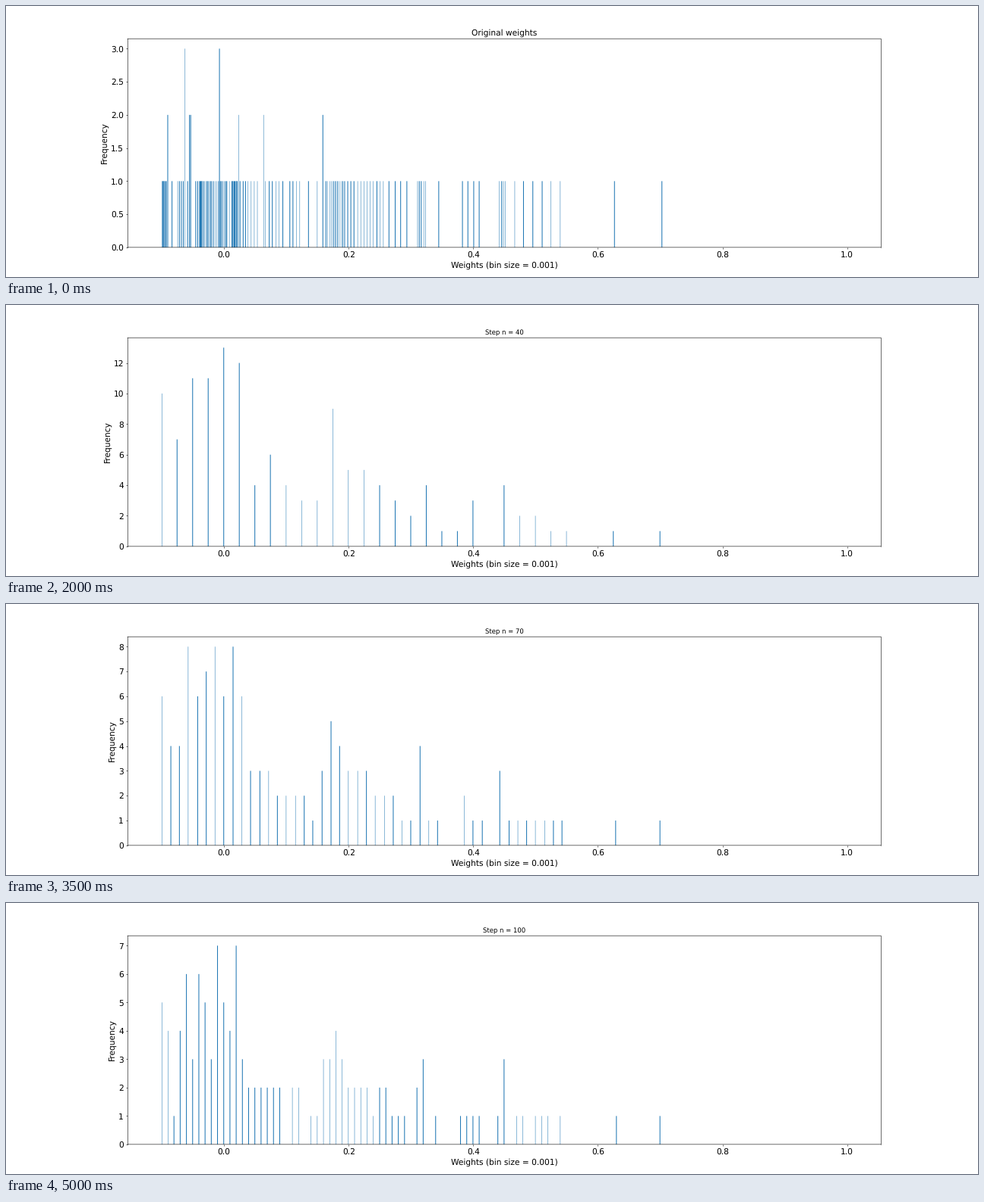
A matplotlib script for the animation above (5.5 s loop, 1280x358 px).

```python
import numpy as np
import matplotlib.pyplot as plt
from matplotlib.animation import FuncAnimation

DPI = 51.2
FONT = 15
PRINT_W, PRINT_H = 2500, 700  # bars and frame sit on this finer pixel grid

# Sorted weights (in thousandths) follow a curve through a few (rank, weight) points
curve = np.array([
    (0, -100), (6, -93.2), (8, -75), (11, -66), (13, -59), (14, -46),
    (16, -40), (21, -35), (28, -18.4), (32, -6), (37, 4.4), (39, 11.6),
    (46, 21.4), (49, 33.7), (53, 53), (54, 66), (59, 94), (60, 105),
    (63, 121), (66, 163), (76, 193), (88, 255), (92, 293), (93, 310),
    (97, 323), (98, 344), (99, 382), (102, 409), (103, 441.5), (106, 451),
    (112, 539), (113, 626), (114, 702),
])
singles = np.interp(np.arange(115), *curve.T)
pairs = np.repeat([-91, -63, -56, -54, 23, 63, 158], 2)
triple = np.repeat(-8, 3)
tail = np.linspace(-148, -112, 15)  # below the first bin
weights = (np.concatenate([tail, singles, pairs, triple]) + 0.435) / 1000

bins = np.arange(-0.1, 1, 0.001)
margin = 0.05 * (bins[-1] - bins[0])
x0, x1 = bins[0] - margin, bins[-1] + margin

plt.rcParams["text.hinting"] = "none"
fig, ax = plt.subplots(figsize=(1280 / DPI, 358 / DPI), dpi=DPI)
fig.patch.set_facecolor("white")
half = 0.5 / PRINT_H
fig.subplots_adjust(left=0.125, right=0.9, bottom=0.11 - half, top=0.88 - half)
for side in ("top", "bottom"):
    ax.spines[side].set_snap(False)


def snap(x):
    """Move data x to the nearest column of the fine pixel grid."""
    left = 0.125 * PRINT_W
    scale = 0.775 * PRINT_W / (x1 - x0)
    return (np.floor(left + (x - x0) * scale + 0.5) - left) / scale + x0


edges = snap(bins)


def draw(i):
    n = 10 * i
    values = np.round(weights * n) / n if n else weights
    counts, _ = np.histogram(values, bins)
    used = np.flatnonzero(counts)

    ax.clear()
    ax.bar(edges[used], counts[used], np.diff(edges)[used], align="edge",
           color="#1f77b4", linewidth=0, snap=False)
    ax.set_xlim(x0, x1)
    ax.set_ylim(0, counts.max() * 1.05)
    ax.tick_params(labelsize=FONT)
    ax.set_xlabel("Weights (bin size = 0.001)", fontsize=FONT)
    ax.set_ylabel("Frequency", fontsize=FONT)
    if n:
        ax.set_title(f"Step n = {n}", fontsize=12)
    else:
        ax.set_title("Original weights", fontsize=FONT)
    return ax.patches


anim = FuncAnimation(fig, draw, frames=11, interval=500, repeat=True,
                     repeat_delay=0, blit=False)
plt.show()
```
